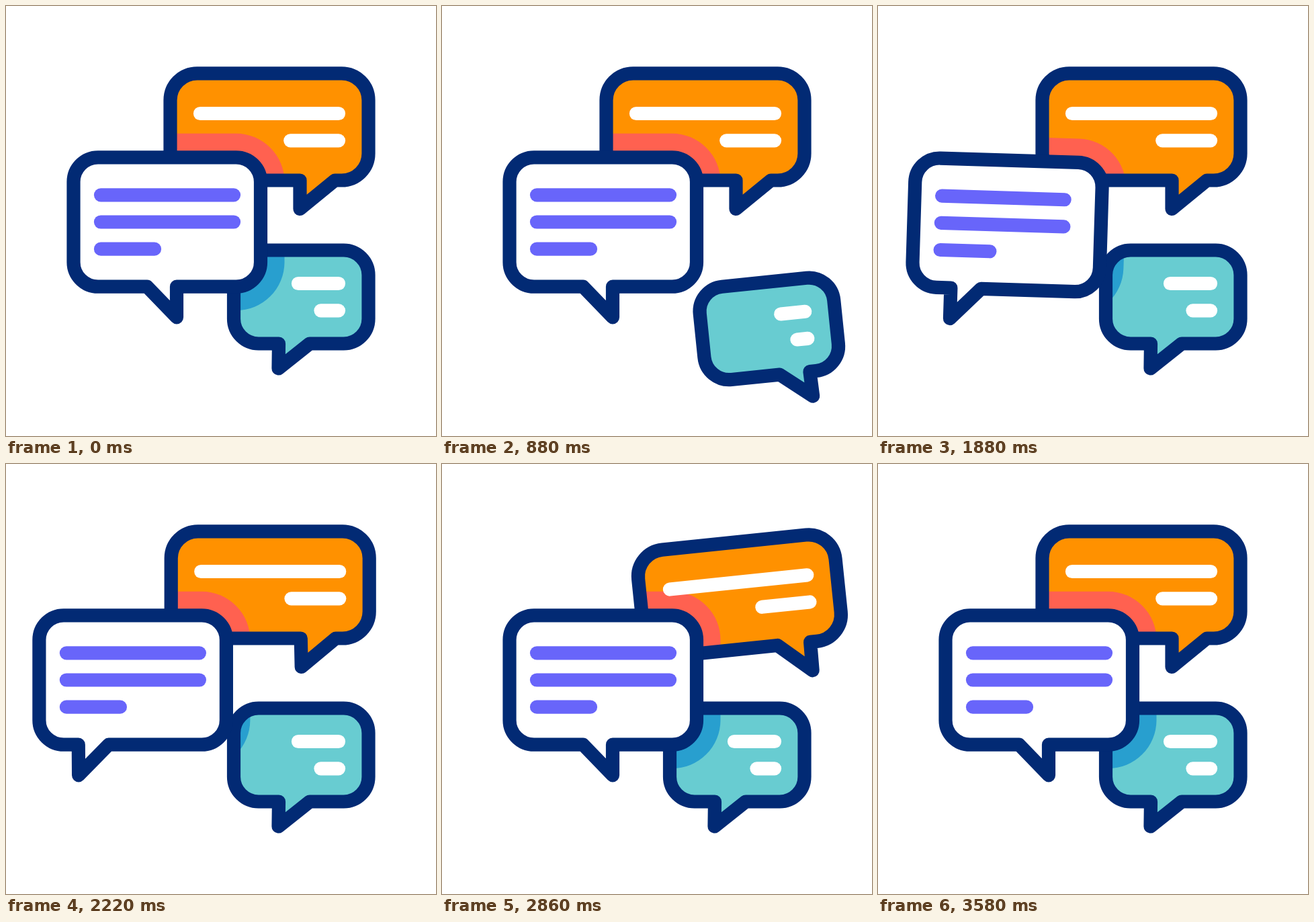
Recreate the animation shown at these times as an HTML page with a canvas. Size 640x640 px, loop 3.6 s.

```html
<!DOCTYPE html>
<html lang="en">
<head>
<meta charset="utf-8">
<title>Chat bubbles</title>
<style>
  html, body { margin: 0; width: 100%; height: 100%; overflow: hidden; background: #fff; }
  canvas { display: block; width: 100vmin; height: 100vmin; }
</style>
</head>
<body>
<canvas id="stage" width="640" height="640"></canvas>
<script>
const ctx = document.getElementById('stage').getContext('2d');
const LOOP = 3600;
const NAVY = '#022a74';
const OUT = 360;    // slide-out time
const SWING = 182;  // time between tilt poses
const BACK = OUT + 4 * SWING;

// tail: x of left joint, tip and right joint, at rest and flipped
// lines: fixed end, free end, y
const teal = {
  start: 0, back: 462, move: [58, 36.5], pivot: [540, 540], tilt: -6, trim: 0.4,
  box: [339, 363.5, 539.5, 502.5], radius: 37, tipY: 539.5,
  tail: [[406, 405.5, 452], [448, 494, 493]],
  fill: '#68ccd1', shade: '#289fcf', ink: '#fff',
  lines: [[495, 435, 413], [495, 468.5, 453.3]]
};
const white = {
  start: 1076, back: 462, move: [-51.5, 0], pivot: [100.5, 463], tilt: -6, trim: 0.22,
  box: [100.5, 225.3, 379, 417.7], radius: 36.5, tipY: 463.3,
  tail: [[210, 254, 254], [158.5, 158.5, 203.5]],
  fill: '#fff', ink: '#6865fa',
  lines: [[141, 339, 281.3], [141, 339, 321.5], [141, 221, 361.7]]
};
const orange = {
  start: 2160, back: 340, move: [62.7, 0], pivot: [540, 302], tilt: 6, trim: 0.277,
  box: [244.5, 100.3, 539.5, 259.5], radius: 40, tipY: 302,
  tail: [[437.5, 437.5, 489.5], [440.5, 488.7, 489.5]],
  fill: '#ff9100', shade: '#ff6150', ink: '#fff',
  lines: [[495, 289, 160], [495, 423.3, 200.3]]
};

const mix = (a, b, k) => a + (b - a) * k;
const ease = k => k < 0.5 ? 4 * k ** 3 : 1 - 4 * (1 - k) ** 3;
const ramp = (t, from, span) => ease(Math.min(1, Math.max(0, (t - from) / span)));

function swing(t, poses) {
  let value = 0;
  poses.forEach((pose, i) => {
    value = mix(value, pose, ramp(t, OUT + i * SWING, SWING));
  });
  return value;
}

function poseAt(b, time) {
  const t = time - b.start;
  return {
    shift: ramp(t, 0, OUT) - ramp(t, BACK, b.back),
    angle: swing(t, [1, -1, 1, 0]) * b.tilt * Math.PI / 180,
    trim: swing(t, [1, 0, 1, 0]) * b.trim
  };
}

function place(b, p) {
  const [x, y] = b.pivot;
  ctx.translate(x + b.move[0] * p.shift, y + b.move[1] * p.shift);
  ctx.rotate(p.angle);
  ctx.translate(-x, -y);
}

function outline(b, p) {
  const [x0, y0, x1, y1] = b.box;
  const [left, tip, right] = b.tail[0].map((x, i) => mix(x, b.tail[1][i], p.shift));
  const r = b.radius;
  ctx.beginPath();
  ctx.moveTo(left, y1);
  ctx.arcTo(x0, y1, x0, y0, r);
  ctx.arcTo(x0, y0, x1, y0, r);
  ctx.arcTo(x1, y0, x1, y1, r);
  ctx.arcTo(x1, y1, x0, y1, r);
  ctx.lineTo(right, y1);
  ctx.lineTo(tip, b.tipY);
  ctx.closePath();
}

// The white bubble's shadow, seen only inside the bubble behind it
function shadow(color, p) {
  const [x0, y0, x1, y1] = white.box;
  const grow = 35.5;
  ctx.save();
  place(white, p);
  ctx.beginPath();
  ctx.roundRect(x0 - grow, y0 - grow, x1 - x0 + 2 * grow, y1 - y0 + 2 * grow, white.radius + grow);
  ctx.fillStyle = color;
  ctx.fill();
  ctx.restore();
}

function bubble(b, time) {
  const p = poseAt(b, time);
  ctx.save();
  place(b, p);
  outline(b, p);
  ctx.fillStyle = b.fill;
  ctx.fill();
  ctx.restore();

  if (b.shade) {
    ctx.save();
    const base = ctx.getTransform();
    place(b, p);
    outline(b, p);
    ctx.clip();
    ctx.setTransform(base);
    shadow(b.shade, poseAt(white, time));
    ctx.restore();
  }

  ctx.save();
  place(b, p);
  outline(b, p);
  ctx.strokeStyle = NAVY;
  ctx.stroke();
  ctx.strokeStyle = b.ink;
  for (const [fixed, free, y] of b.lines) {
    ctx.beginPath();
    ctx.moveTo(fixed, y);
    ctx.lineTo(mix(free, fixed, p.trim), y);
    ctx.stroke();
  }
  ctx.restore();
}

function draw(time) {
  ctx.fillStyle = '#fff';
  ctx.fillRect(0, 0, 640, 640);
  ctx.lineWidth = 20.2;
  ctx.lineCap = ctx.lineJoin = 'round';
  [orange, teal, white].forEach(b => bubble(b, time));
}

const began = performance.now();
function tick() {
  draw((performance.now() - began) % LOOP);
  requestAnimationFrame(tick);
}
tick();
</script>
</body>
</html>
```
